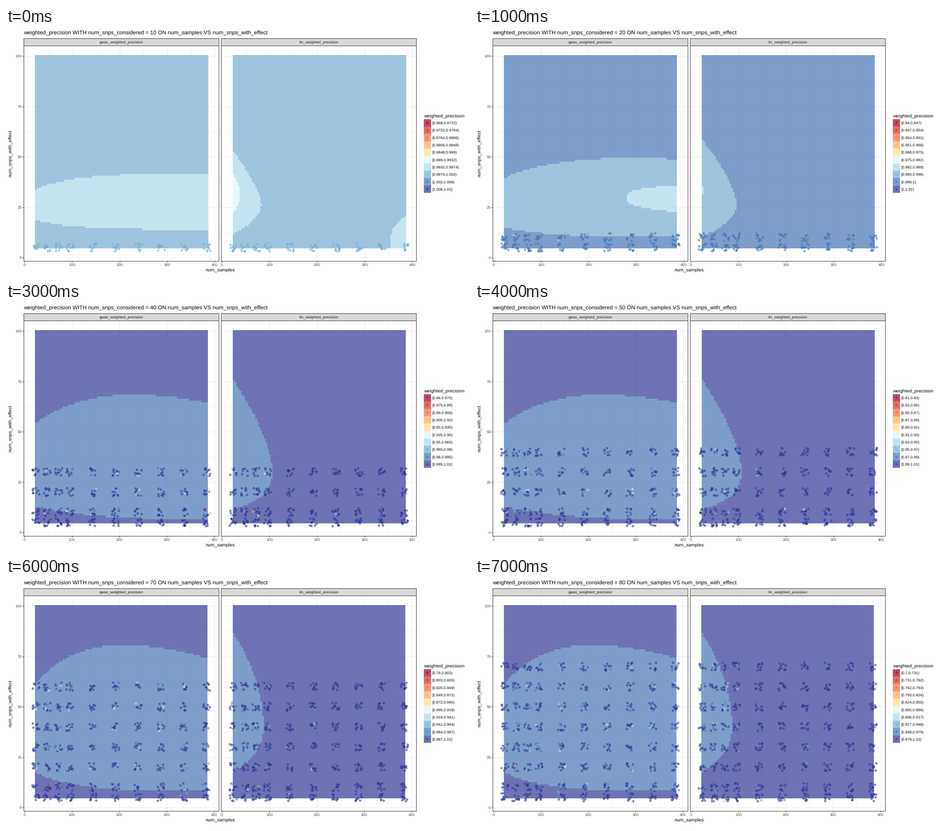
A matplotlib script for the animation above (8 s loop, 1025 px wide and 547 px high).

```python
import numpy as np
import matplotlib.pyplot as plt
from matplotlib.animation import FuncAnimation
from matplotlib.colors import to_rgb
from matplotlib.patches import Rectangle
from matplotlib.path import Path

W, H, DPI = 1025, 547, 100
PX = 72 / DPI                      # points per pixel
plt.rcParams["font.family"] = "Liberation Sans"
plt.rcParams["text.hinting"] = "none"

PALETTE = ["#A50026", "#D73027", "#F46D43", "#FDAE61", "#FEE090",
           "#E0F3F8", "#ABD9E9", "#74ADD1", "#4575B4", "#313695"]
RGB = np.array([to_rgb(c) for c in PALETTE])
ALPHA = 0.7

SHIFT = 437.5                      # distance between the two panels
X0, Y0, SY = 40.7, 508, 4.456
SAMPLES = [24, 48, 72, 96, 144, 192, 240, 288, 336, 384]
EFFECTS = [5, 10, 20, 30, 40, 50, 60, 70]
LEFT, RIGHT = 0, 1

# range of the colour scale for each num_snps_considered
RANGE = {10: (0.968, 1.01), 20: (0.94, 1.01), 30: (0.909, 1.0104),
         40: (0.86, 1.01), 50: (0.81, 1.01), 60: (0.8412, 1.0094),
         70: (0.78, 1.01), 80: (0.7, 1.01)}

regions = {}


def base_level(n, panel):
    if n == 10:
        return 7
    return 8 if n == 20 or (n, panel) == (30, RIGHT) else 9


def blob(states, panel, level, center, rx, ry, a=2, p=(2, 2), tilt=0):
    """Superellipse with its own radius on each of its four sides."""
    def inside(x, y):
        dx = x - center[0]
        dy = y - center[1] - tilt * dx
        u = np.abs(dx) / np.where(dx < 0, *rx)
        v = np.abs(dy) / np.where(dy < 0, *ry)
        return u ** a + v ** np.where(dy < 0, *p) <= 1

    for n in states:
        regions.setdefault((n, panel), []).append((level, inside))


def bulge(states, level, top, peak, bottom, reach, p):
    """Bump growing out of the left edge of the right panel."""
    blob(states, RIGHT, level, (502, peak), (reach, reach),
         (peak - top, bottom - peak), 1, p)


blob([10], LEFT, 6, (400, 390), (365, 900), (67, 56), 3, (2, 3))
blob([20], LEFT, 7, (370, 390), (355, 220), (102, 72), 2.5, (2, 3.4))
blob([20], LEFT, 6, (448, 378), (111, 111), (30, 30), 1, (4, 2.8))
blob([30], LEFT, 8, (310, 390), (390, 310), (161, 103), p=(2, 3.6))
blob([30], LEFT, 7, (360, 382), (292, 475), (98, 68), p=(2, 6), tilt=0.03)
blob([40, 50], LEFT, 8, (300, 390), (295, 400), (187, 87), p=(2, 4.5), tilt=0.04)
blob([60], LEFT, 8, (265, 350), (267, 380), (193, 148), p=(2, 5.3), tilt=0.03)
blob([60], LEFT, 7, (345, 352), (244, 270), (122, 91), p=(2, 5.5), tilt=0.04)
blob([70, 80], LEFT, 8, (270, 350), (241, 375), (202, 119), p=(2, 4.4), tilt=0.04)

bulge([10], 6, 272, 390, 457, 63, (1.4, 2))
bulge([10], 5, 322, 366, 412, 16, (1.6, 2))
blob([10], RIGHT, 6, (886, 470), (35, 35), (56, 130), 1, (2.4, 2))
bulge([20], 7, 247, 388, 461, 76, (1.5, 2.4))
bulge([20], 6, 350, 359, 368, 4, (6, 6))
blob([30], RIGHT, 9, (787, 61), (315, 236), (303, 303))
blob([30], RIGHT, 9, (620, 488), (75, 75), (9, 9))
bulge([30], 7, 259, 358, 430, 38.5, (1.4, 2.4))
bulge([40, 50], 8, 170, 365, 459, 87, (1.5, 3.2))
bulge([60], 8, 118, 402, 478, 200, (1, 2.4))
bulge([60], 7, 246, 310, 368, 12.5, (2, 2))
bulge([70, 80], 8, 121, 325, 430, 67, (1.95, 2.7))

CIRCLE_PLUS = Path.make_compound_path(
    Path.unit_circle(),
    Path([(-1, 0), (1, 0), (0, -1), (0, 1)], [1, 2, 1, 2]))

fig = plt.figure(figsize=(W / DPI, H / DPI), dpi=DPI, facecolor="white")
ax = fig.add_axes([0, 0, 1, 1])


def text(x, y, s, size, color="black", ha="left", **kw):
    ax.text(x, y, s, fontsize=size * PX, color=color, ha=ha, va="baseline", **kw)


def line(x, y, color, z):
    ax.plot(x, y, color=color, lw=PX, zorder=z, solid_capstyle="butt")


def box(x, y, w, h, z, **kw):
    ax.add_patch(Rectangle((x, y), w, h, zorder=z, **kw))


def points(x, y, levels):
    ax.scatter(x, y, s=(4.3 * PX) ** 2, marker=CIRCLE_PLUS, facecolors="none",
               edgecolors=RGB[levels], linewidths=0.6 * PX, zorder=4)


def surface(n, panel, x0, sx):
    xs = x0 + sx * np.linspace(22.2, 385.8, 101)
    ys = Y0 - SY * np.arange(100.5, 4, -1)
    cx, cy = np.meshgrid((xs[1:] + xs[:-1]) / 2, (ys[1:] + ys[:-1]) / 2)
    level = np.full(cx.shape, base_level(n, panel))
    for value, inside in regions[n, panel]:
        level[inside(cx, cy)] = value
    rgba = np.dstack([RGB[level], np.full(cx.shape, ALPHA)])
    ax.imshow(rgba, extent=(xs[0], xs[-1], ys[-1], ys[0]), aspect="auto",
              interpolation="nearest", zorder=3)


def jittered(n, panel, x0, sx):
    rng = np.random.default_rng(n + panel)
    effects = [e for e in EFFECTS if e < n]
    gx, gy = (g.ravel() for g in np.meshgrid(np.repeat(SAMPLES, 10), effects))
    level = np.full(gx.size, base_level(n, panel))
    if (n, panel) == (30, RIGHT):
        level += rng.random(gx.size) < 0.25
    chance = min(0.3, (n - 8) / 170) * np.where(gy == 5, 0.35, 1)
    if panel == RIGHT:
        chance = chance * np.exp(-(gx - 24) / 90) * (n > 20)
    drop = rng.geometric(0.55, gx.size) * (rng.random(gx.size) < chance)
    x = x0 + sx * (gx + rng.uniform(-7.6, 7.6, gx.size))
    y = Y0 - SY * (gy + rng.uniform(-2, 2, gx.size))
    points(x, y, np.maximum(level - drop, 1))


def draw_panel(n, panel, name):
    left, right = 38.5 + SHIFT * panel, 470.5 + SHIFT * panel
    x0, sx = X0 + SHIFT * panel, 1.0547 - 0.00007 * n
    for v in range(0, 401, 50):
        x, major = x0 + sx * v, v % 100 == 0
        line([x, x], [38.5, 515.5], "#EBEBEB" if major else "#F3F3F3", 1)
        if major:
            line([x, x], [515.5, 518.5], "#333333", 2)
            text(x, 527, str(v), 8.45, "#4D4D4D", "center")
    for k in range(9):
        y, major = Y0 - SY * 12.5 * k, k % 2 == 0
        line([left, right], [y, y], "#EBEBEB" if major else "#F3F3F3", 1)
        if major and panel == LEFT:
            line([35.5, 38.5], [y, y], "#333333", 2)
            text(34.7, y + 3, f"{12.5 * k:.0f}", 8.45, "#4D4D4D", "right")
    surface(n, panel, x0, sx)
    jittered(n, panel, x0, sx)
    edge = dict(ec="#333333", lw=PX)
    box(left, 38.5, right - left, 477, 5, fc="none", **edge)
    box(left, 22.5, right - left, 16, 5, fc="#D9D9D9", **edge)
    text((left + right) / 2 + 0.5, 34.3, name, 8.45, "#1A1A1A", "center", zorder=6)


def draw_legend(n):
    text(925, 197.5, "weighted_precision", 10.5)
    digits = 4 if n == 10 else 3
    breaks = [f"{v:.{digits}g}" for v in np.linspace(*RANGE[n], 11)]
    for i, color in enumerate(PALETTE):
        y = 201.5 + 16.35 * i
        box(924.5, y, 16.5, 16.35, 3, fc=color, ec="none", alpha=ALPHA)
        close = "]" if i == 9 else ")"
        text(943, y + 11.8, f"[{breaks[i]},{breaks[i + 1]}{close}", 8.45)
    points(np.full(10, 933), 209.8 + 16.35 * np.arange(10), np.arange(10))


def draw(i):
    n = 10 * (i + 1)
    ax.clear()
    ax.axis("off")
    draw_panel(n, LEFT, "gwas_weighted_precision")
    draw_panel(n, RIGHT, "lm_weighted_precision")
    draw_legend(n)
    text(39, 14.5, f"weighted_precision WITH num_snps_considered = {n} "
         "ON num_samples VS num_snps_with_effect", 12.3)
    text(474, 539, "num_samples", 10.5, ha="center")
    text(12.5, 278, "num_snps_with_effect", 10.5, ha="center",
         rotation=90, rotation_mode="anchor")
    ax.set_xlim(0, W)
    ax.set_ylim(H, 0)
    return []


anim = FuncAnimation(fig, draw, frames=8, interval=1000, repeat=True,
                     repeat_delay=0, init_func=lambda: draw(0))
plt.show()
```
